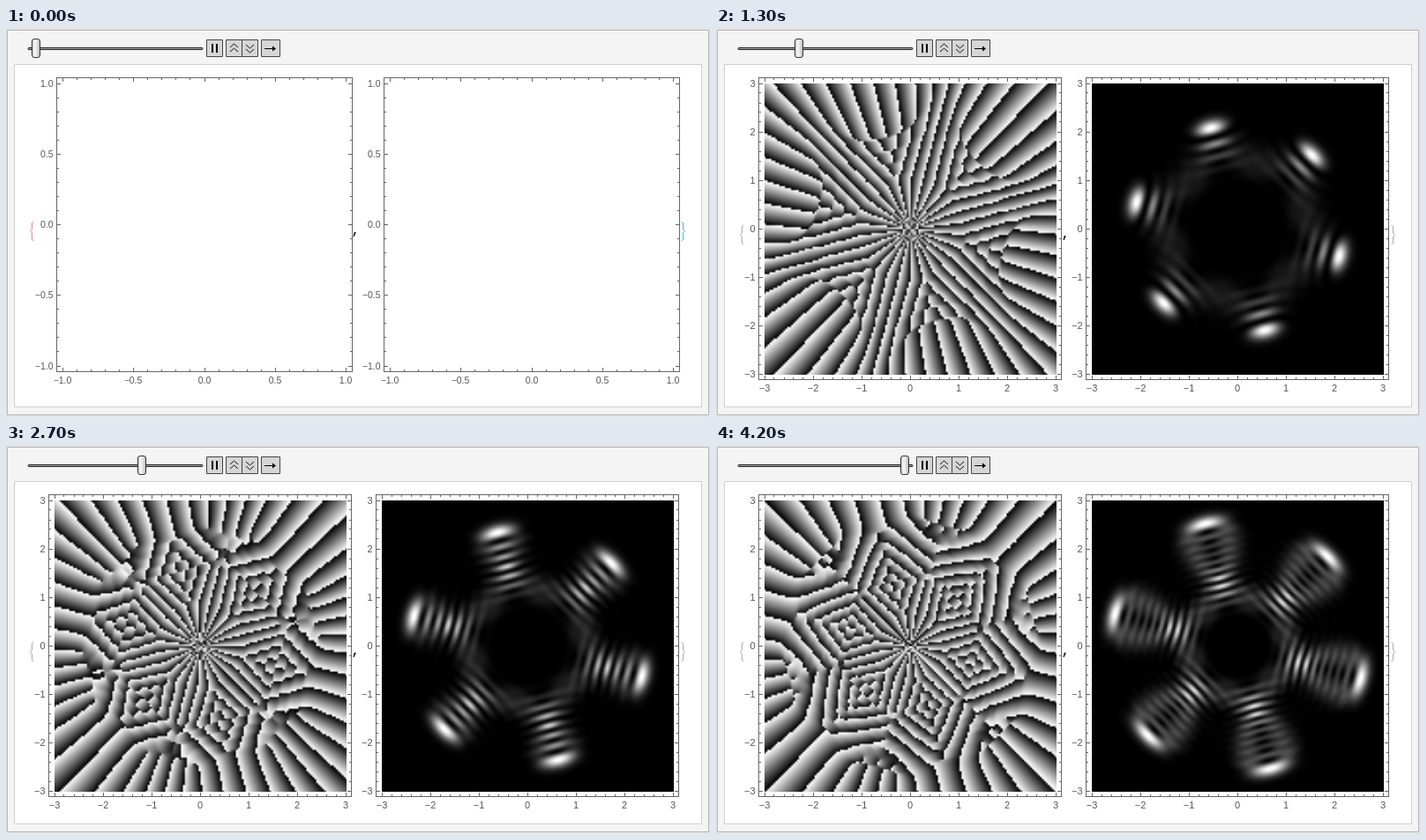
These frames come from a looping animation (798x442 px, 4.5 s). An HTML page with a canvas:

```html
<!DOCTYPE html>
<html lang="en">
<head>
<meta charset="utf-8">
<title>Mode superposition</title>
<style>
html, body { margin: 0; width: 100%; height: 100%; overflow: hidden; background: #f4f4f4; }
canvas { display: block; width: 798px; height: 442px; }
</style>
</head>
<body>
<canvas id="stage" width="798" height="442"></canvas>
<script>
const ctx = document.getElementById('stage').getContext('2d');
const LOOP = 4500;
const STARTS = [0, 300, 800, 1300, 1800, 2300, 2700, 3200, 3700, 4200];
const FIRST = 4;        // lowest order with a field to plot
const GRID = 150, SPAN = 331, SHIFT = 371;
const SCALE = 11.7;     // 2 / waist squared
const BINOM = [1, 4, 6, 4, 1];

const logFact = n => n < 2 ? 0 : Math.log(n) + logFact(n - 1);

function laguerre(p, l, x) {
  let prev = 0, cur = 1;
  for (let k = 0; k < p; k++) {
    const next = ((2 * k + 1 + l - x) * cur - (k + l) * prev) / (k + 1);
    prev = cur;
    cur = next;
  }
  return cur;
}

// Radial part of a Laguerre-Gauss mode, outer lobe positive
function radial(p, l, x, norm) {
  const sign = p % 2 ? -1 : 1;
  return sign * laguerre(p, l, x) * Math.exp(norm + l / 2 * Math.log(x) - x / 2);
}

function toCanvas(values) {
  const c = document.createElement('canvas');
  c.width = c.height = GRID;
  const g = c.getContext('2d');
  const img = g.createImageData(GRID, GRID);
  values.forEach((v, i) => {
    const q = 4 * i;
    img.data[q] = img.data[q + 1] = img.data[q + 2] = 255 * v;
    img.data[q + 3] = 255;
  });
  g.putImageData(img, 0, 0);
  return c;
}

function makeField(order) {
  const terms = BINOM.map((b, k) => {
    const p = order - k, l = 30 - order + 6 * k;
    return { p, l, k, norm: (Math.log(b) + logFact(p) - logFact(p + l)) / 2 };
  });
  const phase = new Float64Array(GRID * GRID);
  const power = new Float64Array(GRID * GRID);
  let top = 0;
  for (let j = 0; j < GRID; j++) {
    for (let i = 0; i < GRID; i++) {
      const x = i / (GRID - 1) * 6 - 3;
      const y = 3 - j / (GRID - 1) * 6;
      const a = Math.atan2(y, x), rho = SCALE * (x * x + y * y);
      let re = 0, im = 0;
      for (const t of terms) {
        const m = radial(t.p, t.l, rho, t.norm);
        const f = -t.l * a - t.k * Math.PI / 2;
        re += m * Math.cos(f);
        im += m * Math.sin(f);
      }
      const n = j * GRID + i;
      phase[n] = Math.atan2(im, re) / (2 * Math.PI) + 0.5;
      power[n] = re * re + im * im;
      top = Math.max(top, power[n]);
    }
  }
  return {
    phase: toCanvas(phase),
    power: toCanvas(power.map(v => Math.min(1, 1.03 * v / top)))
  };
}

const fields = {};
for (let n = FIRST; n <= 10; n++) fields[n] = makeField(n);

function line(points, color, width = 1) {
  ctx.strokeStyle = color;
  ctx.lineWidth = width;
  ctx.beginPath();
  points.forEach(([x, y], i) => i ? ctx.lineTo(x, y) : ctx.moveTo(x, y));
  ctx.stroke();
}

function box(x, y, w, h, fill, stroke, r = 0) {
  ctx.beginPath();
  ctx.roundRect(x, y, w, h, r);
  ctx.fillStyle = fill;
  ctx.fill();
  ctx.strokeStyle = stroke;
  ctx.lineWidth = 1;
  ctx.stroke();
}

function text(s, x, y, align, font, color) {
  ctx.font = font;
  ctx.textAlign = align;
  ctx.textBaseline = 'alphabetic';
  ctx.fillStyle = color;
  ctx.fillText(s, x, y);
}

// Framed axes with ticks on all four sides
function axes(o) {
  const { x, y, w, h, cx, cy, unit, max, step, minor, digits, size } = o;
  const ink = '#666';
  ctx.strokeStyle = ink;
  ctx.lineWidth = 1;
  ctx.strokeRect(x, y, w, h);
  const count = Math.round(max / minor), every = Math.round(step / minor);
  const font = size + 'px "Liberation Sans", Arial, sans-serif';
  for (let k = -count; k <= count; k++) {
    const major = k % every === 0, len = major ? 4.5 : 2.5;
    const px = Math.round(cx + k * minor * unit) + 0.5;
    const py = Math.round(cy - k * minor * unit) + 0.5;
    line([[px, y], [px, y + len]], ink);
    line([[px, y + h], [px, y + h - len]], ink);
    line([[x, py], [x + len, py]], ink);
    line([[x + w, py], [x + w - len, py]], ink);
    if (major) {
      const v = k * minor;
      const s = (k < 0 ? '\u2212' : '') + Math.abs(v).toFixed(digits);
      text(s, px - 0.5, y + h + 13, 'center', font, '#555');
      text(s, x - 4, py + 3.5, 'right', font, '#555');
    }
  }
}

function brace(x, y, dir, color) {
  line([[x + 2 * dir, y], [x, y + 1.5], [x, y + 9], [x - 2 * dir, y + 11],
        [x, y + 13], [x, y + 20.5], [x + 2 * dir, y + 22]], color);
}

function comma(y) {
  text(',', 396, y, 'center', 'bold 14px "Liberation Mono", monospace', '#111');
}

function controls(thumb) {
  box(25, 22.5, 198, 2, '#aaa', '#222', 1);
  const shade = ctx.createLinearGradient(thumb - 5, 0, thumb + 5, 0);
  shade.addColorStop(0, '#c4c4c4');
  shade.addColorStop(0.4, '#fafafa');
  shade.addColorStop(1, '#b4b4b4');
  box(thumb - 4.5, 12.5, 9, 21, shade, '#333', 2.5);

  for (const [x, w] of [[227.5, 18], [249.5, 18], [267.5, 18], [289.5, 21]])
    box(x, 13.5, w, 19, '#d6d6d6', '#444');
  ctx.fillStyle = '#000';
  ctx.fillRect(233, 18, 2, 10);
  ctx.fillRect(238, 18, 2, 10);
  for (const y of [22, 27]) line([[254, y], [258.5, y - 4], [263, y]], '#111');
  for (const y of [19, 24]) line([[272, y], [276.5, y + 4], [281, y]], '#111');
  line([[293, 23.5], [304, 23.5]], '#000');
  ctx.beginPath();
  ctx.moveTo(306, 23.5);
  ctx.lineTo(302, 20.5);
  ctx.lineTo(302, 26.5);
  ctx.fill();
}

function emptyPlots() {
  for (const dx of [0, SHIFT])
    axes({ x: 57.5 + dx, y: 56.5, w: 335, h: 334, cx: 224.5 + dx, cy: 223, unit: 160.5,
           max: 1, step: 0.5, minor: 0.1, digits: 1, size: 10.5 });
  brace(29.5, 220, 1, '#f08070');
  brace(767.5, 220, -1, '#50b0f0');
  comma(234);
}

// Samples are nodes, so the outermost half texel is cropped
function plot(image, x) {
  ctx.drawImage(image, 0.5, 0.5, GRID - 1, GRID - 1, x, 63, SPAN, SPAN);
}

function fieldPlots(field) {
  plot(field.phase, 55);
  plot(field.power, 55 + SHIFT);
  for (const dx of [0, SHIFT])
    axes({ x: 48.5 + dx, y: 56.5, w: 343, h: 343, cx: 219.5 + dx, cy: 227.5, unit: 55,
           max: 3, step: 1, minor: 0.2, digits: 0, size: 11 });
  brace(29.5, 224, 1, '#aaa');
  brace(767.5, 224, -1, '#aaa');
  comma(238);
}

function draw(order) {
  ctx.fillStyle = '#e4e4e4';
  ctx.fillRect(0, 0, 798, 442);
  box(1.5, 2.5, 795, 437, '#f4f4f4', '#b4b4b4');
  box(9.5, 41.5, 779, 389, '#fff', '#cfcfcf');
  controls(14 + 20 * order);
  if (order < FIRST) emptyPlots();
  else fieldPlots(fields[order]);
}

const begin = performance.now();
let shown = 0;
function tick() {
  const t = (performance.now() - begin) % LOOP;
  const order = STARTS.filter(s => s <= t).length;
  if (order !== shown) draw(shown = order);
  requestAnimationFrame(tick);
}
tick();
</script>
</body>
</html>
```
